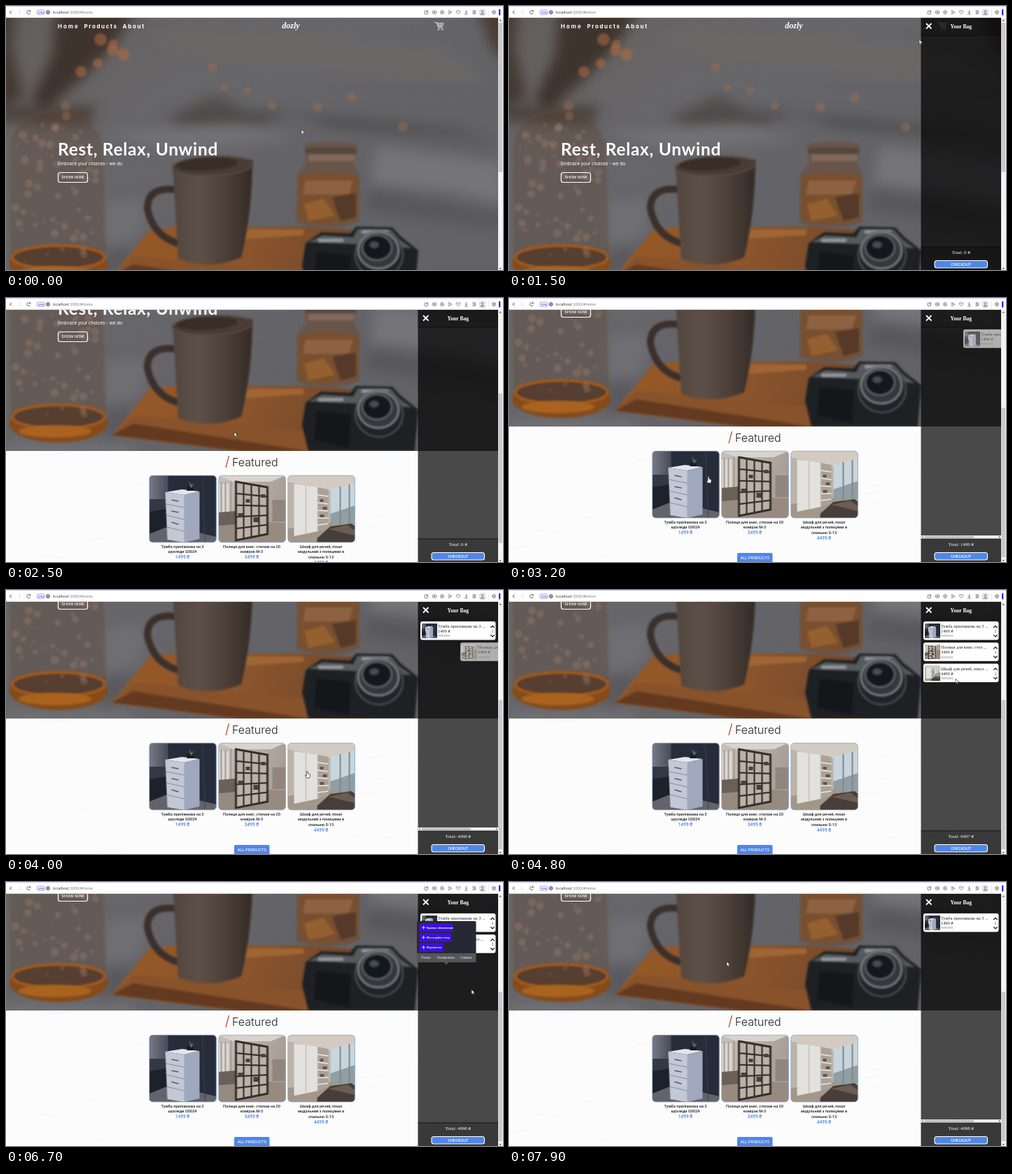
An HTML page with a canvas that plays this animation: 710 by 378 pixels, repeating every 8000 ms.

```html
<!DOCTYPE html>
<html lang="uk">
<head>
<meta charset="utf-8">
<title>Furniture shop</title>
<style>
html, body { margin: 0; width: 710px; height: 378px; overflow: hidden; background: #fff }
canvas { display: block }
</style>
</head>
<body>
<canvas id="stage" width="710" height="378"></canvas>
<script>
const SANS = 'Inter, sans-serif', ROBOTO = 'Roboto, sans-serif', SERIF = '"Liberation Serif", serif';
const BLUE = '#4f86ea', LOOP = 8000, SLIDE = 500;
const main = document.getElementById('stage').getContext('2d');
let c = main;

// Drawing helpers
function path(d, fill, stroke, width = 1) {
  const p = new Path2D(d);
  if (fill) { c.fillStyle = fill; c.fill(p); }
  if (stroke) { c.strokeStyle = stroke; c.lineWidth = width; c.stroke(p); }
}
function rect(x, y, w, h, fill) { c.fillStyle = fill; c.fillRect(x, y, w, h); }
function round(x, y, w, h, r, fill, stroke, width = 1) {
  c.beginPath();
  c.roundRect(x, y, w, h, r);
  if (fill) { c.fillStyle = fill; c.fill(); }
  if (stroke) { c.strokeStyle = stroke; c.lineWidth = width; c.stroke(); }
}
function oval(x, y, rx, ry, fill, stroke, width = 1) {
  c.beginPath();
  c.ellipse(x, y, rx, ry, 0, 0, 7);
  if (fill) { c.fillStyle = fill; c.fill(); }
  if (stroke) { c.strokeStyle = stroke; c.lineWidth = width; c.stroke(); }
}
function text(s, x, y, font, color = '#fff', align = 'left', spacing = 0) {
  c.font = font;
  c.fillStyle = color;
  c.textAlign = align;
  c.letterSpacing = spacing + 'px';
  c.fillText(s, x, y);
}
function gradient(x0, y0, x1, y1, ...colors) {
  const g = c.createLinearGradient(x0, y0, x1, y1);
  colors.forEach((col, i) => g.addColorStop(i / (colors.length - 1), col));
  return g;
}
function cached(w, h, draw) {
  const cv = document.createElement('canvas');
  cv.width = w;
  cv.height = h;
  c = cv.getContext('2d');
  draw();
  c = main;
  return cv;
}
function random(seed) {
  return () => (seed = seed * 16807 % 2147483647) / 2147483647;
}

// Piecewise linear motion through [time, ...values]
function along(keys, t) {
  const i = keys.findIndex(k => k[0] > t);
  if (i < 0) return keys.at(-1).slice(1);
  if (!i) return keys[0].slice(1);
  const a = keys[i - 1], b = keys[i], u = (t - a[0]) / (b[0] - a[0]);
  return a.slice(1).map((v, j) => v + (b[j + 1] - v) * u);
}
const clamp = u => Math.max(0, Math.min(1, u));

const hero = cached(703, 409, () => {
  rect(0, 0, 703, 409, gradient(0, 17, 300, 409, '#625e5c', '#676566', '#66666a', '#636367'));

  // Bed linen and shadows
  c.filter = 'blur(9px)';
  path('M72 0H190L150 60 108 105 78 130 50 165 38 130 66 70Z', '#3f342d');
  path('M-20 0H14L8 60 26 130 -20 160Z', '#453a33');
  path('M-10 138L60 145 130 142 118 172 -10 165Z', '#4a423d');
  path('M230 160L300 128 345 150 410 150 360 172 250 175Z', '#504c4a');
  path('M400 152L520 162 640 175 700 195 620 186 470 176Z', '#525051');
  path('M672 0H720V85L694 62Z', '#4a3c35');
  path('M200 40L420 35 640 65 690 110 500 100 300 80Z', '#6a6867');
  path('M130 180L330 172 420 190 230 206Z', '#737376');
  path('M530 200L710 225V285L640 268 520 255Z', '#747479');
  path('M520 265L630 282 710 300V320L600 305 510 290Z', '#58575b');
  path('M140 280L200 276 190 330 140 345Z', '#707074');
  path('M145 350L185 350 150 390 140 409Z', '#57565a');
  path('M0 400H170L200 420H0Z', '#737377');
  c.filter = 'blur(1.8px)';

  // Glass vase with glowing base
  path('M6 375V200Q14 152 70 150 128 154 138 200L144 375Z', 'rgba(92,66,52,.3)', 'rgba(140,95,65,.25)', 2);
  oval(75, 370, 70, 27, '#854b1b');
  oval(75, 360, 66, 17, '#563e30', '#a55b1d', 4);
  oval(70, 381, 52, 9, '#a9631f');

  // Tray
  path('M152 386L206 320 244 316 440 316 505 322 520 409H335Z', gradient(180, 320, 480, 400, '#965826', '#8c552c', '#74482a'));
  path('M152 386L182 358 440 382 520 409H335Z', '#88522b');
  path('M152 386L335 409H430L182 370Z', '#633a20');
  path('M330 320H425V328L335 334Z', '#a06534');

  // Jar
  path('M426 198Q463 190 502 198L498 226 505 240V308Q465 328 415 310L416 240 428 226Z', '#69564b');
  path('M418 245Q460 232 503 245V304Q460 320 417 306Z', '#79502f');
  path('M428 250H496L490 270H424Z', '#8d6242');
  path('M428 203H500V211H428Z', '#54473f');
  path('M432 213H498V222H432Z', '#82695a');
  path('M426 284L454 276 470 300 432 308Z', '#95602f');
  path('M466 274L500 268V302L478 308Z', '#553a2a');

  // Mug
  path('M243 263Q202 258 202 290 210 330 247 340', null, '#3b302b', 10);
  path('M238 228L352 220Q352 295 336 360 292 379 246 362Z', gradient(238, 0, 352, 0, '#51453e', '#5d5049', '#4b3f38', '#352b26'));
  c.save();
  c.translate(295, 229);
  c.rotate(-.05);
  oval(0, 0, 57, 14, '#4a3c34', '#62554d', 1.5);
  oval(-8, -3, 44, 9, '#382d27');
  c.restore();

  // Camera
  path('M428 340L450 324 492 326 500 316 552 317 564 330 589 350 584 409H432L423 372Z', '#1d2123');
  path('M432 338L452 328 496 331 502 319 550 320 562 334 580 347 496 341Z', '#565a5d');
  path('M446 333H482V338H446ZM508 321H546V326H508Z', '#94979a');
  path('M444 352L492 357 490 404 440 393Z', '#141719');
  oval(533, 356, 34, 33, '#202428', '#565b60', 2);
  oval(532, 350, 29, 26, '#34383c', '#8f9395', 2.5);
  oval(530, 346, 21, 18, '#14171c', '#777b7e', 2);
  oval(526, 342, 7, 5, '#454d5a');

  // Bokeh lights
  const lights = [135,48,9, 153,55,7, 168,69,9, 107,94,8, 131,82,7, 152,64,8, 295,88,7, 312,117,6,
    345,121,6, 380,143,6, 445,145,7, 494,131,7, 567,173,7, 85,143,7, 86,158,6];
  for (let i = 0; i < lights.length; i += 3)
    oval(lights[i], lights[i + 1], lights[i + 2], lights[i + 2], i < 18 ? 'rgba(175,108,66,.55)' : 'rgba(150,108,84,.5)');
  const rnd = random(41);
  for (let i = 0; i < 60; i++) {
    const r = 2 + rnd() * 4;
    oval(12 + rnd() * 118, 165 + rnd() * 195, r, r, 'rgba(175,135,110,.3)');
  }
});

const pictures = [
  () => {
    rect(0, 0, 96, 96, '#272c3a');
    rect(0, 0, 27, 44, gradient(0, 0, 27, 0, '#777b86', '#464b58'));
    path('M0 34H24V75H0Z', '#343844');
    path('M0 52L25 48V80L0 85Z', '#1d212b');
    path('M0 84L30 72 96 88V96H0Z', '#62636b');
    path('M76 0L80 96', null, '#3b4150');
    path('M23 24L47 20 72 23 50 28Z', '#e2e5ec');
    path('M23 24L50 28V96L26 92Z', '#c3c8d4');
    path('M50 28L72 23V91L50 96Z', '#9fa8bd');
    path('M24 41L50 46M24 57L50 63M25 74L50 80', null, '#868d9e');
    path('M32 35L42 37M32 51L42 53M32 67L42 70', null, '#535a6b', 1.5);
    rect(54, 16, 9, 6, '#191c22');
    path('M59 17L57 8 61 14 64 10 61 18Z', '#657457');
  },
  () => {
    rect(0, 0, 96, 96, gradient(0, 0, 96, 20, '#c7c1b9', '#a89e95'));
    path('M0 0H96L75 9H20Z', '#d8d3cd');
    rect(0, 12, 15, 46, '#d9d7d2');
    path('M4 10V60M10 10V60M18 8V60', null, '#a49a90', 2);
    path('M0 64L96 68V96H0Z', '#978a7f');
    path('M0 53L24 51V70L0 72Z', '#696058');
    rect(77, 35, 19, 31, '#91867d');
    path('M25 9L70 17V84L25 93Z', '#bbb1a7', '#342e2b', 3);
    for (let i = 1; i < 4; i++) path(`M${25 + i * 11} ${9 + i * 2}V${93 - i * 2}`, null, '#38312e', 2.2);
    for (let i = 1; i < 5; i++) path(`M25 ${9 + i * 16.8}L70 ${17 + i * 13.4}`, null, '#38312e', 2.2);
    path('M28 54H35V59H28ZM39 34H45V39H39ZM50 60H57V67H50ZM61 27H67V32H61Z', '#4b4039');
  },
  () => {
    rect(0, 0, 96, 96, '#bdb3a8');
    path('M0 0H96V14L62 22 0 9Z', '#d3cbc2');
    path('M61 20L96 11V76L61 70Z', '#c6d6df');
    path('M61 55L96 43V70H61Z', '#8e9fa5');
    path('M75 16V72M88 13V75', null, '#8b8580', 2);
    path('M0 76L62 67 96 74V96H0Z', '#a3978a');
    path('M9 12L43 17V80L9 87Z', '#e3e1dd');
    path('M43 17L58 20V75L43 80Z', '#aaa199');
    path('M26 15V83M43 17V80', null, '#b3aea8');
    path('M43 28L58 30M43 39L58 41M43 50L58 51M43 61L58 61M43 71L58 69', null, '#eeeae5', 1.5);
    path('M46 34H51V38H46ZM50 45H56V49H50ZM46 56H52V60H46Z', '#62564d');
    path('M42 90L61 73 91 69 96 72V96H42Z', '#473e39');
    path('M58 77L85 71 96 79V86Z', '#6a5d54');
  }
].map(draw => cached(96, 96, draw));

const products = [
  { lines: ['Тумба приліжкова на 3', 'шухляди G0024'], short: 'Тумба приліжкова на 3 ...', price: 1499, add: 2950, drop: Infinity },
  { lines: ['Полиця для книг, стелаж на 20', 'комірок M-3'], short: 'Полиця для книг, стел ...', price: 3499, add: 3750, drop: 7400 },
  { lines: ['Шкаф для речей, пінал', 'модульний з полицями в', 'спальню S-13'], short: 'Шкаф для речей, пінал ...', price: 4499, add: 4150, drop: 5200 }
];

function cart() {
  path('M612 23.5H615L618 31H624M614.5 24.5H625L623.5 29.5H616.5M615.5 27H624.3M618 25V30M621 25V30', null, '#ddd', .9);
  oval(618, 33.5, 1.1, 1.1, null, '#ddd', .8);
  oval(623, 33.5, 1.1, 1.1, null, '#ddd', .8);
}

function page(scroll) {
  c.save();
  c.beginPath();
  c.rect(0, 17, 703, 361);
  c.clip();
  c.translate(0, -scroll);
  rect(0, 409, 703, 200, '#fcfcfc');
  const rnd = random(7);
  for (let i = 0; i < 40; i++) {
    const x = rnd() * 680, y = 415 + rnd() * 185;
    path(`M${x} ${y}l${20 + rnd() * 40} ${rnd() * 20 - 10}`, null, '#f5f5f5', .8);
  }
  c.drawImage(hero, 0, 17, 703, 392, 0, 17, 703, 392);
  const nav = `700 8px Montserrat, ${SANS}`;
  text('Home', 74, 32, nav, '#fff', 'left', 1.9);
  text('Products', 111.5, 32, nav, '#fff', 'left', 1.6);
  text('About', 166.5, 32, nav, '#fff', 'left', 1.7);
  text('dozly', 407, 32, `italic 700 12px ${SERIF}`, '#fff', 'center');
  cart();
  text('Rest, Relax, Unwind', 74, 214, '700 24.5px Lato, sans-serif', '#fff', 'left', .7);
  text('Embrace your choices - we do', 74, 228, `400 6.8px ${SANS}`, '#fff', 'left', -.22);
  round(74.5, 238.5, 42, 14, 3, null, '#fff', 1.2);
  text('SHOW NOW', 95.5, 247.3, `500 5.4px ${SANS}`, '#fff', 'center');

  path('M318.5 416L314 433', null, '#c0503f', 1.3);
  text('Featured', 323, 431, `300 16px ${SANS}`, '#222');
  products.forEach((p, i) => {
    const x = 204.5 + i * 99;
    c.save();
    c.beginPath();
    c.roundRect(x, 444, 96, 96, 5);
    c.clip();
    c.drawImage(pictures[i], x, 444);
    c.restore();
    round(x + .2, 444.2, 95.6, 95.6, 5, null, '#8ea3c8', .8);
    p.lines.forEach((s, j) => text(s, x + 47.5, 547.6 + j * 7.6, `500 5.6px ${ROBOTO}`, '#222', 'center'));
    text(p.price + ' ₴', x + 47.5, 548 + p.lines.length * 7.7, `500 6.6px ${ROBOTO}`, BLUE, 'center');
  });
  round(326, 590, 50.5, 16, 2, BLUE);
  text('ALL PRODUCTS', 351.3, 599, `500 5.4px ${SANS}`, '#fff', 'center');
  c.restore();
}

function bagItem(p, i, t) {
  const shown = clamp((t - p.add) / SLIDE) * (1 - clamp((t - p.drop) / SLIDE));
  if (!shown) return;
  c.save();
  c.globalAlpha = .3 + .7 * shown;
  c.translate(114 * (1 - shown), i * 30.3);
  round(592, 45, 107.5, 26.5, 3, '#fff');
  c.drawImage(pictures[i], 594, 47.5, 21.5, 21.5);
  text(p.short, 617, 54, `6.3px ${SERIF}`, '#222');
  text(p.price + ' ₴', 617, 61, `6.3px ${SERIF}`, '#222');
  text('remove', 617, 67.3, `4.6px ${SANS}`, '#777', 'left', .2);
  path('M692.3 54L695 51.3 697.7 54M692.3 64.2L695 66.9 697.7 64.2', null, '#111', 1.2);
  text('1', 695, 61, `5.8px ${SERIF}`, '#222', 'center');
  c.restore();
}

function bag(t) {
  const open = clamp((t - 900) / 400);
  if (!open) return;
  c.save();
  c.beginPath();
  c.rect(588, 17, 115, 361);
  c.clip();
  c.translate(115 * (1 - open), 0);
  rect(588.5, 17, 115, 361, 'rgba(0,0,0,.71)');
  rect(588.5, 17, 115, 24, 'rgba(0,0,0,.15)');
  rect(588.5, 41, 115, 1.5, 'rgba(0,0,0,.4)');
  rect(588.5, 345, 115, 33, 'rgba(0,0,0,.22)');
  rect(588.5, 344, 115, 1.5, 'rgba(0,0,0,.45)');
  path('M596 25L603.5 32.5M603.5 25L596 32.5', null, '#fff', 1.8);
  text('Your Bag', 645.8, 32, `700 7.6px ${SERIF}`, '#fff', 'center');

  products.forEach((p, i) => bagItem(p, i, t));
  const moving = products.some(p => (t >= p.add && t < p.add + SLIDE) || (t >= p.drop && t <= p.drop + SLIDE));
  if (moving) {
    rect(588.5, 340, 115, 4.5, '#eee');
    rect(594, 340.8, 70, 3, '#bcbcbc');
    path('M592 340.7V343.7L590 342.2ZM700 340.7V343.7L702 342.2Z', '#666');
  }
  const total = products.reduce((sum, p) => sum + (t >= p.add && t <= p.drop + SLIDE ? p.price : 0), 0);
  text(`Total: ${total} ₴`, 645.8, 355, `6.8px ${SERIF}`, '#fff', 'center');
  round(608, 364.5, 75.5, 10.5, 3, BLUE, '#fff', 1.1);
  text('CHECKOUT', 645.8, 371.8, `600 5.2px ${SANS}`, '#fff', 'center');
  c.restore();
}

function selectionMenu() {
  round(587, 56, 84.5, 59, 2, '#262833');
  rect(587, 102, 84.5, 13, '#54555a');
  path('M626 115H632L629 118.5Z', '#54555a');
  [['Кратко объяснение', 48.5], ['Исследуйте тему', 47], ['Перевести', 35]].forEach(([label, w], i) => {
    const y = 59 + i * 14.2;
    round(590, y, w, 12.5, 2.5, '#3a10dc');
    path(`M594 ${y + 6.2}h5m-2.5-2.5v5`, null, '#fff', .8);
    text(label, 601, y + 8, `600 4.4px ${SERIF}`);
  });
  ['Поиск', 'Копировать', 'Снимок'].forEach((s, i) => text(s, 600 + i * 28.8, 110, `4.4px ${SANS}`, '#eee', 'center'));
  path('M613 106V111M645 106V111', null, '#777', .5);
}

function browser(scroll) {
  rect(0, 0, 710, 17, '#fff');
  rect(0, 0, 710, 1.2, '#d6d2ef');
  rect(0, 16.3, 703, .7, '#c9c7d4');
  path('M8 6.7L5.5 9 8 11.3M5.5 9H6', null, '#444', .9);
  path('M18 6.7L20.5 9 18 11.3', null, '#ccc', .8);
  path('M34.3 7.5A2.5 2.5 0 1 0 34.6 10M34.7 6V8H32.7', null, '#444', .8);
  round(44.5, 6, 10.5, 6, 1.5, null, '#7770d8', .7);
  text('VPN', 49.8, 10.5, `600 3.8px ${SANS}`, '#625bd0', 'center');
  oval(60, 9, 2.5, 2.5, '#ccd', '#445', .8);
  path('M57.5 9H62.5M60 6.5V11.5', null, '#445', .5);
  text('localhost', 67, 11, `5.3px ${SANS}`, '#333');
  const w = c.measureText('localhost').width;
  text(':3000/#home', 67 + w, 11, `5.3px ${SANS}`, '#777');

  round(598, 7, 4.5, 4.5, .8, null, '#555', .7);
  path('M600 9.5L603 6.3', null, '#555', .8);
  round(609.5, 7, 5, 4, .8, null, '#555', .7);
  oval(612, 9, .9, .9, '#555');
  oval(623, 9, 2.5, 2.5, null, '#555', .7);
  oval(623, 9, .9, .9, '#555');
  path('M632.5 6.5L637 9 632.5 11.5 633.2 9Z', null, '#555', .7);
  path('M646 11.5L643.4 8.8Q643 6.4 645 6.7L646 7.5 647 6.7Q649 6.4 648.6 8.8Z', null, '#555', .7);
  path('M657.5 6V10M655.7 8.5L657.5 10.2 659.3 8.5M655 11.8H660', null, '#555', .7);
  path('M666.5 7H671.5M666.5 9H671.5M666.5 11H671.5M668 6.2V7.8M670 8.2V9.8M668 10.2V11.8', null, '#555', .7);
  round(675.5, 4, 10, 10, 3, '#e6e4ef');
  oval(680.5, 7.7, 1.3, 1.3, null, '#555', .7);
  path('M678 12Q680.5 8.5 683 12Z', null, '#555', .7);
  path('M689.5 4V17', null, '#ddd', .7);
  path('M697 6.3L699.3 7.6V10.4L697 11.7 694.7 10.4V7.6ZM694.7 7.6L697 9 699.3 7.6M697 9V11.7', null, '#555', .7);
  round(704, 4.5, 2.3, 9, 1, '#4a18e8');

  rect(703, 17, 7, 361, '#f3f3f3');
  rect(703.5, 24 + scroll * .592, 5.5, 214, '#c9c9cb');
  path('M704.5 21.5H708L706.2 19ZM704.5 375H708L706.2 377.3Z', '#666');
}

const POINTER = [[0, 422, 177], [300, 422, 177], [700, 617, 29], [1000, 617, 29], [1500, 586, 48], [2000, 332, 188],
  [2500, 326, 192], [2800, 326, 205], [3000, 285, 256], [3300, 285, 256], [3600, 350, 260], [3800, 352, 260],
  [4050, 450, 260], [4250, 450, 260], [4800, 638, 127], [5100, 628, 125], [5400, 628, 125], [6300, 660, 150],
  [6700, 665, 154], [7000, 665, 154], [7300, 628, 96], [7450, 628, 96], [7900, 311, 114]];
const SCROLL = [[1900, 0], [2500, 190], [2700, 225]];

function pointer(t) {
  const [x, y] = along(POINTER, t);
  c.save();
  c.translate(x, y);
  if (t >= 2950 && t < 4350)
    path('M-1 0Q0-1 1 0V3L4 4V7L3 9H-1L-3 5.5-1 5.5Z', '#fff', '#222', .7);
  else
    path('M0 0V6.5L1.5 5.2 2.6 7.5 3.6 7 2.6 4.8 4.6 4.6Z', '#fff', '#222', .6);
  c.restore();
}

function frame(now) {
  const t = Math.floor(now % LOOP / 100) * 100;
  const [scroll] = along(SCROLL, t);
  c.clearRect(0, 0, 710, 378);
  page(scroll);
  bag(t);
  browser(scroll);
  if (t >= 5400 && t < 7000) selectionMenu();
  pointer(t);
  requestAnimationFrame(frame);
}
requestAnimationFrame(frame);
</script>
</body>
</html>
```
